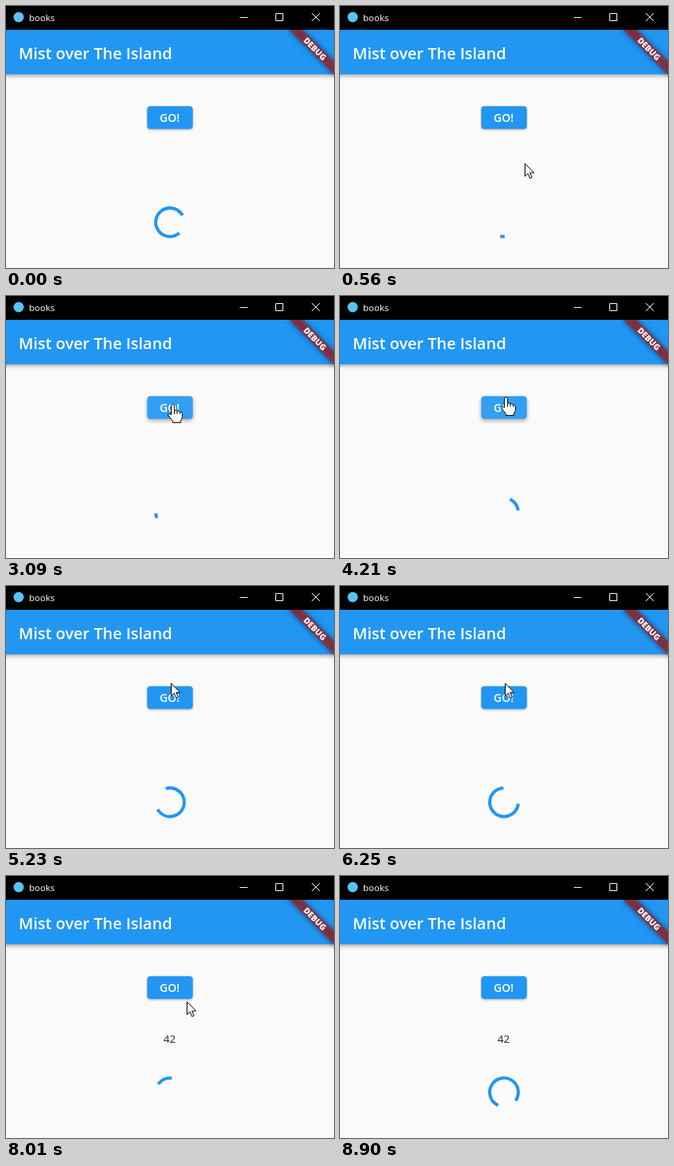
An HTML page with a canvas for the animation above (8980 ms loop, 414 by 330 pixels).

```html
<!DOCTYPE html>
<html lang="en">
<head>
<meta charset="utf-8">
<title>books</title>
<style>
  html, body { margin: 0; width: 100%; height: 100%; overflow: hidden; background: #fafafa; }
  canvas { display: block; width: 414px; height: 330px; }
</style>
</head>
<body>
<canvas id="stage"></canvas>
<script>
const W = 414, H = 330, LOOP = 8980, TICK = 79.3;
const BLUE = '#2196f3';
const FONT = '"Open Sans", "Noto Sans", sans-serif';
const BUTTON = { x: 178.3, y: 126.3, w: 57.4, h: 28.4 };
const CLICK = 2300, ANSWER = 7080;

const canvas = document.getElementById('stage');
const ctx = canvas.getContext('2d');
const ratio = window.devicePixelRatio || 1;
canvas.width = W * ratio;
canvas.height = H * ratio;

// Pointer stops, joined by smooth moves
const STOPS = [
  { t: 320, x: 400, y: 238 },
  { t: 555, x: 233, y: 198 },
  { t: 1040, x: 207, y: 106 },
  { t: 1820, x: 208, y: 130 },
  { t: CLICK, x: 210, y: 136 },
  { t: 3900, x: 210, y: 136 },
  { t: 4400, x: 208, y: 122 },
  { t: 7700, x: 208, y: 122 },
  { t: 8260, x: 242, y: 184 }
];

const ARROW = new Path2D('M0 0V16L3.7 12.6 6.3 18.5 8.8 17.4 6.2 11.6H11.3Z');
const HAND = new Path2D('M-2 2Q-2 0 0 0Q2 0 2 2V8Q4 6.5 5.5 8.7Q7.5 7.3 9 9.6Q12 9 12 12V16' +
  'Q11.5 19 10 20.5V23H0V21Q-3 17-6 13.5Q-6.5 10.5-2 13Z');
const KNUCKLES = new Path2D('M2 8V12M5.5 9V12M9 10V12');

const smooth = f => f * f * (3 - 2 * f);

// cubic-bezier(0.4, 0, 0.2, 1)
function ease(x) {
  if (x <= 0) return 0;
  if (x >= 1) return 1;
  let lo = 0, hi = 1;
  for (let i = 0; i < 24; i++) {
    const s = (lo + hi) / 2, r = 1 - s;
    if (1.2 * r * r * s + 0.6 * r * s * s + s * s * s < x) lo = s; else hi = s;
  }
  return smooth(lo);
}

// Null while the pointer is outside the window
function pointerAt(t) {
  const i = STOPS.findIndex(stop => t <= stop.t);
  if (i < 1) return null;
  const a = STOPS[i - 1], b = STOPS[i];
  const f = smooth((t - a.t) / (b.t - a.t));
  return { x: a.x + (b.x - a.x) * f, y: a.y + (b.y - a.y) * f };
}

function overButton(p) {
  const { x, y, w, h } = BUTTON;
  return p !== null && p.x >= x && p.x <= x + w && p.y >= y && p.y <= y + h;
}

function text(str, x, y, size, weight, color, align = 'left') {
  ctx.font = `${weight} ${size}px ${FONT}`;
  ctx.textAlign = align;
  ctx.fillStyle = color;
  ctx.fillText(str, x, y);
}

function fillRaised(shape, dy, blur) {
  ctx.save();
  ctx.shadowColor = 'rgba(0,0,0,0.36)';
  ctx.shadowBlur = blur * ratio;
  ctx.shadowOffsetY = dy * ratio;
  ctx.fillStyle = BLUE;
  ctx.fill(shape);
  ctx.restore();
}

function drawAppBar() {
  const bar = new Path2D();
  bar.rect(-10, 30, W + 20, 56);
  fillRaised(bar, 2, 5);
  text('Mist over The Island', 16, 67, 20, 600, '#fff');
}

function drawTitleBar() {
  ctx.fillStyle = '#000';
  ctx.fillRect(0, 0, W, 30);
  ctx.fillStyle = '#54c5f8';
  ctx.beginPath();
  ctx.arc(16, 14, 6.5, 0, Math.PI * 2);
  ctx.fill();
  text('books', 29, 19, 11.5, 400, '#fff');
  ctx.strokeStyle = '#fff';
  ctx.lineWidth = 1;
  ctx.beginPath();
  ctx.moveTo(295, 14.5); ctx.lineTo(305, 14.5);
  ctx.rect(340.5, 9.5, 9, 9);
  ctx.moveTo(386, 9); ctx.lineTo(396, 19);
  ctx.moveTo(396, 9); ctx.lineTo(386, 19);
  ctx.stroke();
}

function drawBanner() {
  ctx.save();
  ctx.beginPath();
  ctx.rect(0, 30, W, H - 30);
  ctx.clip();
  ctx.translate(W, 30);
  ctx.rotate(Math.PI / 4);
  ctx.filter = `blur(${3.5 * ratio}px)`;
  ctx.fillStyle = 'rgba(0,0,0,0.5)';
  ctx.fillRect(-40, 28, 80, 12);
  ctx.filter = 'none';
  ctx.fillStyle = 'rgba(183,28,28,0.627)';
  ctx.fillRect(-40, 28, 80, 12);
  text('DEBUG', 0, 37.7, 10.4, 900, '#fff', 'center');
  ctx.restore();
}

function drawButton(t, hover) {
  const { x, y, w, h } = BUTTON;
  const shape = new Path2D();
  shape.roundRect(x, y, w, h, 4);
  fillRaised(shape, hover ? 2 : 1, hover ? 5 : 3);
  if (hover) {
    ctx.fillStyle = 'rgba(255,255,255,0.08)';
    ctx.fill(shape);
  }
  const age = (t - CLICK) / 420;
  if (age >= 0 && age < 1) {
    ctx.save();
    ctx.clip(shape);
    ctx.fillStyle = `rgba(255,255,255,${0.24 * Math.min(1, 2 * (1 - age))})`;
    ctx.beginPath();
    ctx.arc(210, 137, 6 + 34 * ease(age * 1.6), 0, Math.PI * 2);
    ctx.fill();
    ctx.restore();
  }
  text('GO!', 206.5, 146, 14, 600, '#fff', 'center');
}

// The head sweeps out 270 degrees, then the tail catches up, while the whole arc turns
function drawSpinner(cycles) {
  const p = cycles % 1, n = cycles - p;
  const head = 270 * ease(p * 2), tail = 270 * ease(p * 2 - 1);
  const start = -90 + 216 * n + 306 * p + tail;
  const end = start + Math.max(head - tail, 0.06);
  const rad = Math.PI / 180;
  ctx.strokeStyle = BLUE;
  ctx.lineWidth = 4;
  ctx.lineCap = 'square';
  ctx.beginPath();
  ctx.arc(207, 272.4, 18, start * rad, end * rad);
  ctx.stroke();
  ctx.lineCap = 'butt';
}

function drawPointer(p, hover) {
  const shape = hover ? HAND : ARROW;
  ctx.save();
  ctx.translate(Math.round(p.x) + 0.5, Math.round(p.y) + 0.5);
  ctx.fillStyle = '#fff';
  ctx.strokeStyle = '#000';
  ctx.lineWidth = 1;
  ctx.lineJoin = 'round';
  ctx.fill(shape);
  ctx.stroke(shape);
  if (hover) ctx.stroke(KNUCKLES);
  ctx.restore();
}

function render(tick) {
  const t = tick * TICK;
  const pointer = pointerAt(t);
  const hover = overButton(pointer);

  ctx.setTransform(ratio, 0, 0, ratio, 0, 0);
  ctx.fillStyle = '#fafafa';
  ctx.fillRect(0, 0, W, H);
  drawAppBar();
  drawTitleBar();
  drawBanner();
  drawButton(t, hover);
  if (t >= ANSWER) text('42', 206.5, 210, 13.5, 400, 'rgba(0,0,0,0.87)', 'center');
  drawSpinner(0.475 + 0.0623 * tick);
  if (pointer) drawPointer(pointer, hover);
}

function loop() {
  const ms = performance.now() % LOOP;
  render(Math.floor((ms + 8) / TICK));
  requestAnimationFrame(loop);
}
loop();
</script>
</body>
</html>
```
